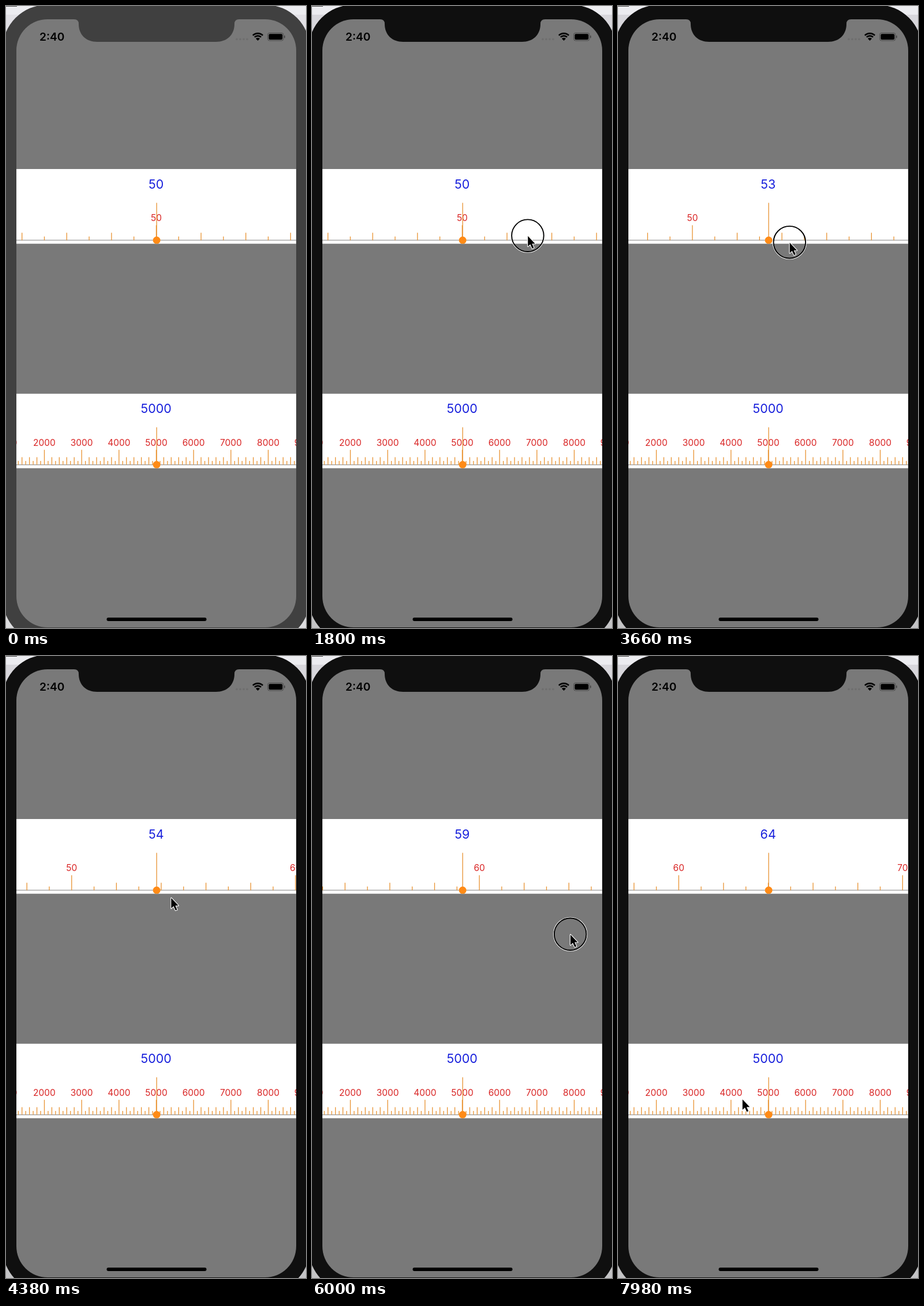
These frames come from a looping animation (520 by 1076 pixels, 8 s). An HTML page with a canvas:

```html
<!DOCTYPE html>
<html lang="en">
<head>
<meta charset="utf-8">
<title>Ruler picker</title>
<style>
  html, body { margin: 0; width: 100%; height: 100%; overflow: hidden; }
  canvas { display: block; }
</style>
</head>
<body>
<canvas width="520" height="1076"></canvas>
<script>
const ctx = document.querySelector('canvas').getContext('2d');
const LOOP = 8000, STEP = 60;
const TRAVEL = 660;                       // longest move between two presses
const LEFT = 18, WIDTH = 485, CENTER = LEFT + WIDTH / 2;
const PT = WIDTH / 375;                   // one point of the phone screen
const GAP = 30 * PT;

// A press holds from down to up while the pointer drags from one spot to another.
const press = (down, up, from, to = from) => ({ down, up, from, to });
const presses = [
  press(960, 1500, [345.5, 393]),
  press(1740, 2800, [374, 397], [257.6, 404]),
  press(3060, 4260, [312.5, 400], [282.2, 417]),
  press(4920, 5310, [442, 442], [246, 462]),
  press(5820, 6600, [456.9, 480], [269.5, 501])
];
const entry = press(0, 120, [473, 500]);
const exit = press(7980, LOOP, [215.5, 766]);

const progress = (t, from, to) => Math.min(1, Math.max(0, (t - from) / (to - from)));
const ease = p => p < 0.5 ? 4 * p ** 3 : 1 - 4 * (1 - p) ** 3;
const mix = (a, b, p) => a + (b - a) * p;
const mixPoint = (a, b, p) => a.map((v, i) => mix(v, b[i], p));

function pointerAt(time) {
  let point = entry.from;
  let free = entry.up;
  for (const { down, up, from, to } of [...presses, exit]) {
    const leave = Math.max(free, down - TRAVEL);
    point = mixPoint(point, from, ease(progress(time, leave, down)));
    point = mixPoint(point, to, ease(progress(time, down, up)));
    free = up;
  }
  return point;
}

// Drags move the scale; after each release it snaps to the nearest whole number.
function valueAt(time) {
  let value = 50;
  for (const { down, up, from, to } of presses) {
    value += (from[0] - to[0]) / GAP * ease(progress(time, down, up));
    value = mix(value, Math.round(value), ease(progress(time, up + 150, up + 480)));
  }
  return value;
}

function rect(x, y, w, h, color, radius = 0) {
  ctx.fillStyle = color;
  ctx.beginPath();
  ctx.roundRect(x, y, w, h, radius);
  ctx.fill();
}

function disc(x, y, r, color) {
  ctx.fillStyle = color;
  ctx.beginPath();
  ctx.arc(x, y, r, 0, 7);
  ctx.fill();
}

function ring(x, y, r, width, color, from = 0, to = 7) {
  ctx.strokeStyle = color;
  ctx.lineWidth = width;
  ctx.beginPath();
  ctx.arc(x, y, r, from, to);
  ctx.stroke();
}

function text(str, x, y, size, color, weight = 400, align = 'center') {
  ctx.font = `${weight} ${size}px Inter, Roboto, sans-serif`;
  ctx.textAlign = align;
  ctx.fillStyle = color;
  ctx.fillText(str, x, y);
}

const notch = new Path2D(`M118 22 V23 Q126 23 126 31 C126 50 139 62 158 62
  H364 C383 62 396 50 396 31 Q396 23 404 23 V22 Z`);
const arrow = new Path2D('M0.5 1 V19 L4.6 15.2 L8 22.5 L10.8 21.3 L7.6 14.2 H13 Z');

function drawPhone(active) {
  const bezel = active ? '#0f0f0f' : '#404040';
  rect(0, 0, 520, 1076, active ? '#c4c4c6' : '#dedee0');
  rect(0, 0, 520, 15, '#ececf0');
  rect(0, 15, 520, 60, active ? '#d8d7dc' : '#e2e1e6');
  rect(0, 0, 19, 1, '#444');
  rect(-6, -2, 533, 1103, bezel, 77);
  rect(LEFT, 23, WIDTH, 1052, '#797979', 54);
  ctx.fillStyle = bezel;
  ctx.fill(notch);
  rect(174.5, 1058, 173, 6, '#000', 3);
}

function drawStatusBar() {
  text('2:40', 58, 60, 19.2, '#000', 600, 'left');
  for (let i = 0; i < 4; i++) disc(400 + i * 6, 57.5, 1.8, '#6e6e6e');

  const start = -Math.PI * 0.75, end = -Math.PI * 0.25;
  ring(436.5, 59.5, 12.2, 2.7, '#000', start, end);
  ring(436.5, 59.5, 7.9, 2.7, '#000', start, end);
  ring(436.5, 60, 2.5, 5, '#000', start, end);

  rect(453, 46, 28.5, 14.5, '#4c4c4c', 4.4);
  rect(454, 47, 26.5, 12.5, '#797979', 3.4);
  rect(455.3, 48.3, 24, 10, '#000', 2.3);
  rect(482, 51, 1.8, 4.5, '#4c4c4c', 1);
}

// One unit is one tick; every tenth tick carries a label.
function drawRuler(top, value, gap, scale) {
  const height = 100 * PT, base = top + 95.2 * PT;
  const marker = CENTER + PT / 2;
  ctx.save();
  ctx.beginPath();
  ctx.rect(LEFT, top, WIDTH, height);
  ctx.clip();
  rect(LEFT, top, WIDTH, height, '#fff');
  rect(LEFT, base - PT / 2, WIDTH, PT, '#999');

  const reach = Math.ceil(265 / gap);
  for (let n = Math.floor(value) - reach; n <= value + reach; n++) {
    const x = CENTER + (n - value) * gap;
    const length = PT * (n % 10 === 0 ? 20 : n % 2 === 0 ? 10 : 5);
    rect(x - PT / 2, base - length, PT, length, '#e8912f');
    if (n % 10 === 0) text(n * scale, x, top + 90.3, 15.5, '#d92424');
  }

  rect(marker - PT / 2, base - 50 * PT, PT, 50 * PT, '#e8912f');
  disc(marker, base, 5 * PT, '#ff8b17');
  text(Math.round(value) * scale, CENTER - 0.3, top + 33.6, 21.5, '#1820dc');
  ctx.restore();
}

function drawPointer(time) {
  if (time < entry.up) return;
  const [x, y] = pointerAt(time);
  if (presses.some(({ down, up }) => time >= down && time < up)) {
    ring(x, y + 0.2, 29, 1.2, '#fff');
    ring(x, y + 0.2, 27.8, 1.9, '#000');
  }
  ctx.save();
  ctx.translate(x - 0.2, y);
  ctx.lineJoin = 'round';
  ctx.strokeStyle = '#fff';
  ctx.lineWidth = 2.2;
  ctx.stroke(arrow);
  ctx.fillStyle = '#000';
  ctx.fill(arrow);
  ctx.restore();
}

function draw(now) {
  const time = Math.floor((now % LOOP) / STEP) * STEP;
  drawPhone(time >= 1200);
  drawStatusBar();
  drawRuler(282.1, valueAt(time), GAP, 1);
  drawRuler(670.4, 50, GAP / 6, 100);
  drawPointer(time);
}

const start = performance.now();
function tick() {
  draw(performance.now() - start);
  requestAnimationFrame(tick);
}
tick();
</script>
</body>
</html>
```
